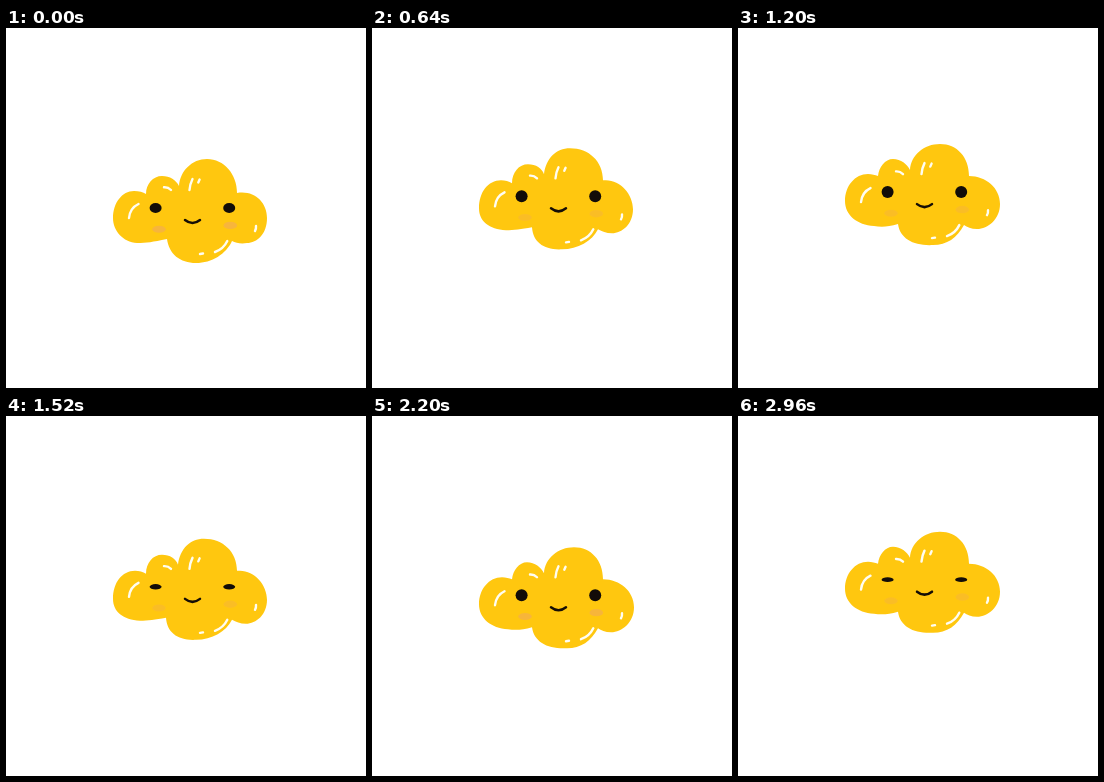
An HTML page for the animation above (3000 ms loop, 360x360 px).

```html
<!DOCTYPE html>
<html lang="en">
<head>
<meta charset="utf-8">
<title>Happy cloud</title>
<style>
  html, body { margin: 0; width: 100%; height: 100%; overflow: hidden; background: #fff; }
  svg { display: block; width: 100%; height: 100%; }
  .line { fill: none; stroke-linecap: round; stroke-linejoin: round; }
</style>
</head>
<body>
<svg viewBox="0 0 360 360">
  <g id="cloud">
    <path id="body" fill="#ffc70f"/>
    <g id="cheeks" fill="#f7b53c">
      <ellipse cx="153" cy="201.2" rx="6.8" ry="3.5"/>
      <ellipse cx="224.3" cy="197.4" rx="6.8" ry="3.7"/>
    </g>
    <path class="line" stroke="#fffdf2" stroke-width="2.4" d="M123 190Q124 180 132.5 176M158 159.3Q162 159 165 162M183.5 162Q184 156 186.5 151M192.3 154.5L193.6 151.5M249 203Q250.3 201 250 198M209 224Q217.5 221 221.3 213M194 226L197 225.5"/>
    <path class="line" stroke="#150d06" stroke-width="2.5" d="M179 192Q186.5 198 194 192"/>
    <g fill="#120c08">
      <ellipse class="eye" cx="149.6" cy="180" rx="6"/>
      <ellipse class="eye" cx="223.2" cy="180" rx="6"/>
    </g>
  </g>
</svg>
<script>
  const LOOP = 3000, STEP = 40;
  const BOB = 2060, RISE = 17;
  const WOBBLE = 880;
  const BLINK = 1350, FIRST_BLINK = 250, BLINK_HALF = 400;

  // Three hand-drawn outlines shown in turn.
  const outlines = [
    'M161 211C146 214 141 215 131 215C117 214 107 203 107 190C107 175 116 163 128 163C133 163 137 164 140 166C140 156 147 148 156 148C164 148 170 152 173 158C174 143 186 131 201 131C218 131 231 146 231 165C248 162 261 174 261 190C261 206 251 215 241 215C235 216 230 215 226 213C220 226 206 235 190 235C174 235 163 226 161 211Z',
    'M160 212C150 215 143 215 136 214C119 213 107 203 107 189C107 174 117 162 130 162C134 162 137 163 140 164C141 155 147 147 155 147C163 147 169 152 172 158C173 143 186 132 202 132C219 132 231 145 231 164C248 164 262 176 262 192C262 207 250 217 239 217C233 217 229 215 226 213C219 226 209 233 195 233C176 234 162 227 160 212Z',
    'M160 211C149 213 142 214 134 214C117 213 107 205 107 192C107 176 116 164 129 164C133 164 137 165 140 167C140 156 147 148 156 148C164 148 170 152 172 158C174 142 184 132 198 132C217 132 231 145 231 164C247 162 261 177 261 193C261 208 250 217 240 217C234 217 230 215 226 213C220 225 206 233 190 233C172 234 161 226 160 211Z'
  ];

  const cloud = document.getElementById('cloud');
  const body = document.getElementById('body');
  const cheeks = document.getElementById('cheeks');
  const eyes = document.querySelectorAll('.eye');

  function blinkAmount(t) {
    const nearest = Math.round((t - FIRST_BLINK) / BLINK) * BLINK + FIRST_BLINK;
    const distance = Math.min(1, Math.abs(t - nearest) / BLINK_HALF);
    return (1 + Math.cos(Math.PI * distance)) / 2;
  }

  function draw(t) {
    const lift = (1 - Math.cos(2 * Math.PI * t / BOB)) / 2;
    cloud.setAttribute('transform', `translate(0 ${-RISE * lift})`);
    body.setAttribute('d', outlines[Math.floor((t % WOBBLE) / WOBBLE * outlines.length)]);
    cheeks.setAttribute('opacity', 1 - 0.5 * Math.min(1, lift * 2));
    const eyeRadius = 6 - 3.6 * blinkAmount(t);
    eyes.forEach(eye => eye.setAttribute('ry', eyeRadius));
  }

  function tick() {
    const t = performance.now() % LOOP;
    draw(Math.floor(t / STEP) * STEP);
    requestAnimationFrame(tick);
  }
  tick();
</script>
</body>
</html>
```
